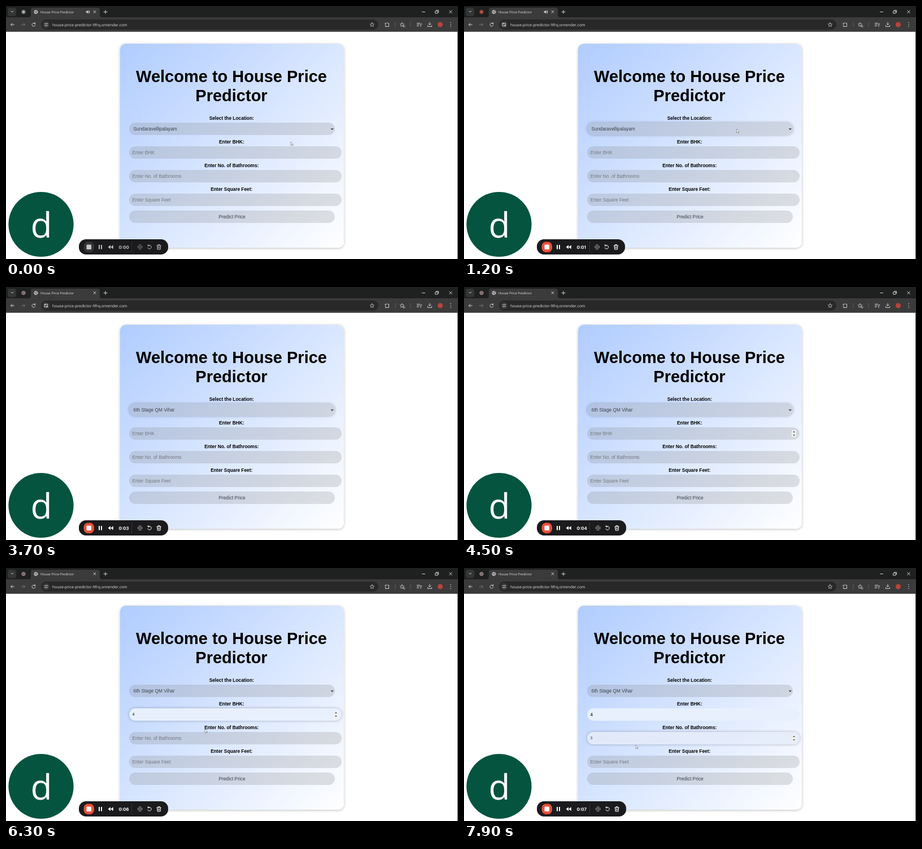
An HTML page for the animation above (8000 ms loop, 800 by 449 pixels).

```html
<!DOCTYPE html>
<html lang="en">
<head>
<meta charset="utf-8">
<title>House Price Predictor</title>
<style>
  html, body { margin: 0; width: 100%; height: 100%; overflow: hidden; background: #fff; }
  body { font: 8.33px/22px "Liberation Sans", Arial, sans-serif; }
  div, svg { position: absolute; box-sizing: border-box; }
  svg { left: 0; top: 0; width: 800px; height: 449px; }
  text { text-rendering: geometricPrecision; }
  .card { left: 202px; top: 67px; width: 395.5px; height: 361.5px; border-radius: 10px;
    background: linear-gradient(135deg, #b0ccff, #fff); box-shadow: 0 1px 5px rgba(0,0,0,.26); }
  h1 { position: absolute; margin: 0; left: 201px; top: 109px; width: 396px;
    font-size: 29px; line-height: 33.5px; text-align: center; }
  .label { left: 202px; width: 394.5px; text-align: center; font-weight: bold; }
  .field { left: 218px; width: 376px; height: 22px; border-radius: 11px; padding-left: 5.5px;
    white-space: nowrap; background: rgba(128,128,128,.24); color: #747982; }
  .short { width: 364px; padding-left: 7.5px; color: #3c424c; }
  .button { padding: 0; text-align: center; }
  .ui { font-family: "Open Sans", "Noto Sans", sans-serif; fill: #e3e3e3; }
  .line { fill: none; stroke: #d0d0d0; stroke-width: 1; stroke-linecap: round; stroke-linejoin: round; }
</style>
</head>
<body>
<div class="card"></div>
<h1>Welcome to House Price<br>Predictor</h1>

<svg viewBox="0 0 800 449">
  <!-- browser window -->
  <path d="M0 0H800V45H0Z" fill="#1f2020"/>
  <path d="M0 20H40Q44 20 44 16V7Q44 3 48 3H162Q166 3 166 7V16Q166 20 170 20H800V449H799V45.700H0Z" fill="#3b3b3b"/>
  <rect x="3" y="3" width="15" height="15" rx="4" fill="#343535"/>
  <rect x="62" y="24" width="597" height="18" rx="9" fill="#282828"/>
  <g class="line">
    <path d="M9 9l2 2 2-2M154.900 8.300l4 4m0-4l-4 4M173 10.500h6m-3-3v6"/>
    <path d="M736.500 10.500h5M784.700 8l4.600 4.600m0-4.600l-4.600 4.600M760 9h4v4h-4zM761.500 7.600h4v4"/>
    <circle cx="53" cy="10.500" r="3.200" fill="#aaa"/>
    <path d="M50.500 9.500q2 0 2.500 2t2 1M53.500 7.500q0 2 2 2" stroke="#3b3b3b" stroke-width=".8"/>
    <path d="M14.500 33h-6m2.500-2.500L8.500 33l2.500 2.500"/>
    <path d="M27.500 33h6m-2.500-2.500l2.500 2.500-2.500 2.500" stroke="#777"/>
    <path d="M51.300 31.200A3 3 0 1 0 52 33.500M51.700 29.500v2h-2"/>
    <path d="M648 29.500l1.100 2.300 2.500.3-1.800 1.700.4 2.500-2.200-1.200-2.200 1.200.4-2.500-1.800-1.700 2.500-.3z" stroke-width=".8"/>
    <path d="M671.500 30.500h2q1-2 2 0h2v6h-6v-2q2-1 0-2z"/>
    <path d="M689 29v8M716 29v8" stroke="#666" stroke-width=".8"/>
    <path d="M701 29.500l1 2.200 2.500.3-1.800 1.700.4 2.500-2.100-1.200-2.200 1.200.4-2.500-1.800-1.700 2.500-.3zM703 35h3m-3 2h3" stroke-width=".8"/>
    <path d="M727.500 30.500h5m-5 2.500h4m-4 2.500h2.500m4 1v-5l2 .5"/>
    <path d="M750 29v4.500m-2-2l2 2 2-2M746.500 34.500v2h7v-2"/>
  </g>
  <circle cx="768.500" cy="33" r="4.500" fill="#b8443c"/>
  <path d="M787 29.500h.1m-.1 3.500h.1m-.1 3.500h.1" stroke="#d0d0d0" stroke-width="1.500" stroke-linecap="round"/>
  <circle cx="31" cy="10.500" r="3" fill="none" stroke="#d8d8d8" id="ring"/>
  <circle cx="31" cy="10.500" r="1.700" id="dot"/>
  <g id="speaker" fill="#d0d0d0">
    <path d="M141.500 9.300h1.500l2-1.800v6l-2-1.800h-1.500z"/>
    <path class="line" stroke-width=".7" d="M146 9q1.200 1.500 0 3M147.200 8q2 2.500 0 5"/>
  </g>
  <circle cx="71" cy="33" r="6" fill="#3b3b3b"/>
  <path id="tune" class="line" d="M68.500 31.300h2m3 0h.3M68.500 34.700h.3m3 0h2M72 30.300v2M70.300 33.700v2"/>
  <path id="blocked" class="line" d="M68.500 30.500h5v5h-5zM68 30l6 6"/>
  <text class="ui" x="61" y="12.700" font-size="5.900">House Price Predictor</text>
  <text class="ui" x="82" y="35.500" font-size="6.900">house-price-predictor-9frq.onrender.com</text>

  <!-- form details -->
  <path d="M575.300 217.200l2 2 2-2" fill="none" stroke="#222" stroke-width="1.100"/>
  <g id="spinner">
    <rect x="580" y="-6" width="8" height="12" rx="1" fill="#f1f1f1"/>
    <path d="M582 -2l2-2.500 2 2.500zM582 2l2 2.500 2-2.500z" fill="#555"/>
  </g>

  <!-- camera bubble and recorder bar -->
  <circle cx="62" cy="387.500" r="57.600" fill="#04543f"/>
  <text class="ui" x="43.500" y="411.300" font-size="62" font-weight="500" style="fill:#fff">d</text>
  <rect id="bar" x="129" y="414" width="158" height="27" rx="12.500" fill="#1b1b1d"/>
  <rect id="stop" x="137.500" y="418.500" width="18.500" height="18.500" rx="7.500"/>
  <g id="controls" fill="#fff">
    <rect x="142.500" y="423.500" width="8.500" height="8.500" rx="1.200"/>
    <path d="M164 424h2v7.500h-2zM168 424h2v7.500h-2zM185 424.200v7l-4.500-3.500zM189.700 424.200v7l-4.500-3.500z"/>
    <text id="clock" x="199.500" y="430.500" font-size="7.800" font-weight="bold" font-family="Inter, sans-serif"></text>
    <path d="M222.500 418v19" stroke="#333"/>
    <g id="tools">
      <path d="M236 424h2.500M233.600 426.400h7.300M233.600 428.800h7.300M236 431.200h2.500"
        stroke="#fff" stroke-width="1.400" stroke-linecap="round" stroke-dasharray="0 2.400"/>
      <path class="line" style="stroke:#fff" d="M251.500 425.500A3.300 3.300 0 1 1 250.800 429M251.300 423.300v2.400h2.400"/>
      <path class="line" style="stroke:#fff" d="M266.800 425.300h7.600M269 425v-1.500h3.200v1.500M267.700 425.500l.4 6.500h5l.4-6.500M269.500 427.500v2.500m2.200-2.500v2.500"/>
    </g>
  </g>
  <path id="cursor" d="M0 0v6.300l1.500-1.300 1 2.200 1.100-.5-1-2.100h2z" fill="#fff" stroke="#666" stroke-width=".6"/>
</svg>

<script>
const $ = id => document.getElementById(id);
const ramp = (t, start, span) => Math.min(1, Math.max(0, (t - start) / span));
const show = (el, on) => el.style.visibility = on ? 'visible' : 'hidden';

function add(cls, top, text) {
  const el = document.createElement('div');
  el.className = cls;
  el.style.top = top + 'px';
  el.textContent = text;
  document.body.insertBefore(el, document.querySelector('svg'));
  return el;
}
['Select the Location:', 'Enter BHK:', 'Enter No. of Bathrooms:', 'Enter Square Feet:']
  .forEach((text, i) => add('label', 188 + 42.1 * i, text));
const place = add('field short', 207, '');
const rooms = add('field', 249, '');
const baths = add('field', 291, '');
add('field', 333, 'Enter Square Feet');
add('field short button', 363, 'Predict Price');

// Cursor stops: time, x, y
const path = [[0, 504, 241], [100, 504, 241], [500, 494, 230], [1100, 482.5, 218.5],
  [1600, 482.5, 218.5], [2200, 475, 227], [2700, 475, 227], [4900, 352, 286],
  [6400, 352, 286], [7300, 304, 314], [8000, 304, 314]];

function cursorAt(t) {
  const i = path.findIndex(p => p[0] > t);
  const a = path[i - 1], b = path[i];
  const k = ramp(t, a[0], b[0] - a[0]), e = k * k * (3 - 2 * k);
  return [a[1] + (b[1] - a[1]) * e, a[2] + (b[2] - a[2]) * e];
}

function focus(el, t, from, to) {
  const k = ramp(t, from, 300) * (1 - ramp(t, to, 300));
  el.style.boxShadow = `0 0 5px rgba(0,0,0,${.27 * k})`;
}

// Suggestion fills a field: small preview text, then the accepted value
function autofill(el, t, hint, value, start, accept, blur) {
  const k = ramp(t, start, 400), filled = t >= start;
  const alpha = .24 + .76 * k;
  const rgb = [232, 240, 254].map(c => (128 * .24 * (1 - k) + c * k) / alpha);
  el.textContent = filled ? value : hint;
  el.style.background = `rgba(${rgb},${alpha})`;
  el.style.color = !filled ? '' : t < accept ? '#444' : '#000';
  el.style.fontSize = filled && t < blur ? '7px' : '';
}

function draw(t) {
  place.textContent = t < 3600 ? 'Sundaravellipalayam' : '6th Stage QM Vihar';
  focus(place, t, 500, 4850);
  focus(rooms, t, 4850, 6750);
  focus(baths, t, 6750, 9000);
  autofill(rooms, t, 'Enter BHK', '4', 5450, 5900, 6800);
  autofill(baths, t, 'Enter No. of Bathrooms', '3', 7550, 8000, 9000);

  show($('spinner'), t >= 4150);
  $('spinner').setAttribute('transform', `translate(0 ${t < 6750 ? 260 : 302})`);
  show($('speaker'), t < 3600);
  const blocked = t >= 400 && t < 4100;
  show($('blocked'), blocked);
  show($('tune'), !blocked);

  const lit = t >= 700 && t < 1700;
  $('ring').setAttribute('stroke', lit ? '#e8604c' : '#d0c8c8');
  $('dot').setAttribute('fill', lit ? '#f06a55' : t < 300 ? '#e0e0e0' : '#c87468');

  const on = ramp(t, 100, 300), sec = Math.max(0, Math.floor((t - 150) / 1000));
  $('stop').setAttribute('fill', `rgb(${52 + 180 * on},${52 + 28 * on},${56 + 2 * on})`);
  $('controls').setAttribute('opacity', .72 + .28 * on);
  $('clock').textContent = '0:0' + sec;
  $('bar').setAttribute('width', sec === 1 ? 156 : 158);
  $('tools').setAttribute('transform', `translate(${sec === 1 ? -1.6 : 0} 0)`);

  show($('cursor'), t < 3000 || (t >= 4950 && t < 6550) || t >= 7250);
  $('cursor').setAttribute('transform', `translate(${cursorAt(t)})`);
}

function tick() {
  draw(performance.now() % 8000);
  requestAnimationFrame(tick);
}
tick();
</script>
</body>
</html>
```
